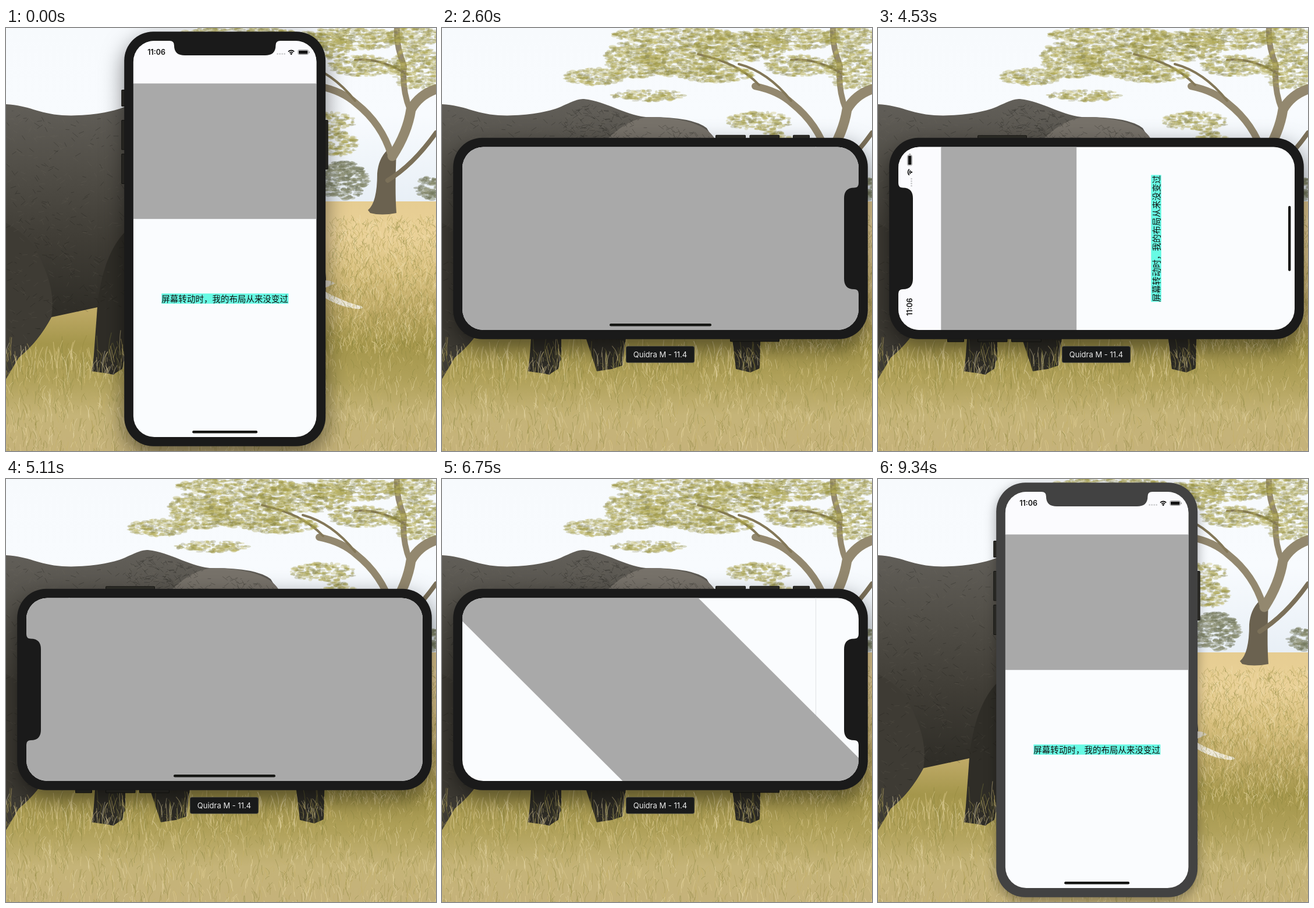
Animation of 739 by 727 pixels, one loop 9440 ms. Source, as an HTML page with a canvas:

```html
<!DOCTYPE html>
<html lang="zh">
<head>
<meta charset="utf-8">
<style>
html, body { margin: 0; width: 100%; height: 100%; overflow: hidden; background: #f8fafd; }
canvas { display: block; }
</style>
</head>
<body>
<canvas id="stage" width="739" height="727"></canvas>
<script>
const W = 739, H = 727, LOOP = 9440, RAD = Math.PI / 180;
const ctx = document.getElementById('stage').getContext('2d');
const GRAY = '#a9a9a9', WHITE = '#fafcfe', INK = '#161714';

// device: device angle; from/to: content angle relative to the device;
// dur, first, steps: timing of the turn; x0: progress at its first step
const turns = [
  { at: 0,    device: 0,   from: 0,   to: 0 },
  { at: 1950, device: 90,  from: 0,   to: -90, dur: 650, first: 200, steps: 5, x0: 0 },
  { at: 3640, device: 0,   from: -90, to: 0,   dur: 600, first: 150, steps: 5, x0: .16 },
  { at: 4530, device: -90, from: 0,   to: 90,  dur: 580, first: 150, steps: 5, x0: 0 },
  { at: 6000, device: 180, from: 90,  to: 90 },
  { at: 6750, device: 90,  from: 90,  to: 270, dur: 580, first: 150, steps: 5, x0: .326 },
  { at: 7770, device: 0,   from: -90, to: 0,   dur: 750, first: 150, steps: 6, x0: 0 }
];

const clamp = v => Math.max(0, Math.min(1, v));
const mix = (a, b, k) => a + (b - a) * k;
const ease = x => x * x * (3 - 2 * x);
const sideways = turn => Math.abs(turn.device) === 90;

let seed = 7;
function rand(a, b) {
  seed = (seed * 16807) % 2147483647;
  return mix(a, b, seed / 2147483647);
}

function gradient(c, y0, y1, colors) {
  const g = c.createLinearGradient(0, y0, 0, y1);
  colors.forEach((col, i) => g.addColorStop(i / (colors.length - 1), col));
  return g;
}

function shape(c, d, fill) {
  c.fillStyle = fill;
  c.fill(new Path2D(d));
}

function line(c, d, color, width) {
  c.strokeStyle = color;
  c.lineWidth = width;
  c.stroke(new Path2D(d));
}

function box(c, x, y, w, h, r, fill) {
  c.beginPath();
  c.roundRect(x, y, w, h, r);
  c.fillStyle = fill;
  c.fill();
}

function oval(c, x, y, rx, ry, fill) {
  c.beginPath();
  c.ellipse(x, y, rx, ry, 0, 0, 7);
  c.fillStyle = fill;
  c.fill();
}

function leaves(c, x, y, rx, ry, colors) {
  for (let i = 0; i < rx * ry / 4; i++) {
    const a = rand(0, 6.28), r = Math.sqrt(rand(0, 1));
    oval(c, x + Math.cos(a) * r * rx, y + Math.sin(a) * r * ry,
      rand(2, 7), rand(1, 3), colors[i % colors.length]);
  }
}

function paintScene() {
  const canvas = document.createElement('canvas');
  canvas.width = W;
  canvas.height = H;
  const c = canvas.getContext('2d');
  c.lineCap = c.lineJoin = 'round';

  c.fillStyle = gradient(c, 0, 300, ['#f7fafd', '#f8fbfe', '#e8eff6']);
  c.fillRect(0, 0, W, 310);
  c.fillStyle = gradient(c, 298, H,
    ['#e6cd92', '#ead198', '#d8c07f', '#bfaa67', '#a4964b', '#b0a15a', '#c5b478', '#c5b27a']);
  c.fillRect(0, 298, W, H);

  // distant bushes
  const dull = ['#7e826570', '#8f927270', '#6d715870'];
  leaves(c, 580, 262, 42, 33, dull);
  leaves(c, 728, 275, 22, 20, dull);

  // tree
  const bark = '#6b6250', limb = '#93886f';
  shape(c, 'M622 313Q638 300 638 250Q640 225 655 210L671 212Q668 280 671 318Q645 323 626 318Z', bark);
  line(c, 'M662 218Q646 165 602 130Q578 108 538 100', limb, 12);
  line(c, 'M664 220Q690 180 696 140Q710 115 739 105', limb, 17);
  line(c, 'M656 262Q700 235 739 180', '#7b7059', 8);
  line(c, 'M694 140Q680 105 684 65Q670 30 672 0', limb, 10);
  line(c, 'M545 98Q510 60 440 45M600 125Q560 75 510 62M690 80Q640 50 600 55', '#837758', 4);
  const olive = ['#8f8a3c48', '#b4aa5058', '#a39b4550', '#c9c07458', '#77743840'];
  [[262, 84, 50, 15], [335, 53, 55, 33], [400, 12, 105, 15], [415, 55, 75, 30],
   [470, 78, 65, 15], [515, 32, 80, 26], [595, 18, 85, 20], [612, 65, 55, 18],
   [705, 68, 42, 38], [700, 15, 45, 18], [355, 116, 62, 10], [545, 160, 55, 16],
   [570, 198, 32, 22]
  ].forEach(b => leaves(c, ...b, olive));

  // elephant
  const hide = gradient(c, 125, 600, ['#625f59', '#514e47', '#403d36', '#302e28', '#2d2b25']);
  shape(c, 'M0 131C40 133 55 147 97 150C135 152 180 146 205 135C225 126 232 122 244 122' +
    'C285 127 310 148 350 153Q430 152 455 172L475 205L540 330L550 430L546 585L530 592' +
    'L505 586L496 510L320 500L310 580L292 586L266 590L248 535L205 530L201 585L185 595' +
    'L147 590Q157 540 157 480L78 497Q55 540 22 566L0 603Z', hide);
  shape(c, 'M286 189Q325 151 365 153Q448 157 468 189Z', '#77726a');
  shape(c, 'M205 350Q166 390 157 480L149 588L185 596L205 570Z', '#2f2d27');
  shape(c, 'M0 335Q48 360 65 410Q85 455 78 497Q55 540 22 566L0 603Z', '#3e3b34');
  c.save();
  c.clip(new Path2D('M0 140L90 156L205 150L244 128L350 160L460 182V200L205 210V480L78 495L0 590Z'));
  for (let i = 0; i < 1100; i++) {
    const x = rand(0, 460), y = rand(132, x > 204 ? 200 : 580);
    line(c, `M${x} ${y}l${rand(3, 9)} ${rand(-7, 8)}`, i % 2 ? '#18171348' : '#817c7028', 1);
  }
  c.restore();
  shape(c, 'M545 434Q558 433 566 439L547 447Z', '#ddd7c8');
  shape(c, 'M545 451Q580 471 611 478Q617 482 605 483Q574 480 545 462Z', '#eee9db');

  // grass, from far to near
  const straw = ['#e8d59a78', '#81803a68', '#c6b26680', '#f3e5bc70', '#94883e68'];
  for (let i = 0; i < 4200; i++) {
    const y = mix(330, 745, i / 4200), x = rand(y < 560 ? 555 : 0, W), h = rand(5, 25) * y / H;
    line(c, `M${x} ${y}q${rand(-3, 3)} ${-h / 2} ${rand(-7, 7)} ${-h}`, straw[i % 5], 1);
  }
  for (let i = 0; i < 260; i++) {
    const x = rand(0, 560), y = rand(560, 612), h = rand(15, 45);
    line(c, `M${x} ${y}q${rand(-4, 4)} ${-h / 2} ${rand(-9, 9)} ${-h}`, straw[i % 5], 1.2);
  }
  return canvas;
}

const scene = paintScene();

function indicator(angle, alpha) {
  if (alpha <= 0) return;
  const upright = angle === 0, w = upright ? 112 : 175, y = upright ? 329.5 : 146.2;
  ctx.save();
  ctx.rotate(angle * RAD);
  ctx.globalAlpha = alpha;
  box(ctx, -w / 2, y, w, 4.4, 2.2, INK);
  ctx.restore();
}

function statusBar(alpha) {
  if (alpha <= 0) return;
  ctx.save();
  ctx.globalAlpha = alpha;
  ctx.fillStyle = '#111';
  ctx.textAlign = 'left';
  ctx.font = '600 12.5px Inter, "Open Sans", sans-serif';
  ctx.fillText('11:06', -133, -320.5);
  for (let i = 0; i < 4; i++) oval(ctx, 90.5 + i * 4, -318, 1.3, 1.3, '#c4c5c7');
  ctx.strokeStyle = '#111';
  ctx.lineWidth = 1.8;
  for (const r of [3.9, 7]) {
    ctx.beginPath();
    ctx.arc(114, -317, r, -Math.PI * .76, -Math.PI * .24);
    ctx.stroke();
  }
  oval(ctx, 114, -318, 1.5, 1.5, '#111');
  ctx.beginPath();
  ctx.roundRect(125.5, -325, 18, 8, 2.3);
  ctx.lineWidth = .8;
  ctx.strokeStyle = '#888';
  ctx.stroke();
  box(ctx, 126.8, -323.8, 15.4, 5.7, 1, '#111');
  box(ctx, 144.4, -322.3, 1.3, 3, .6, '#888');
  ctx.restore();
}

function note(y) {
  ctx.fillStyle = '#67fae4';
  ctx.fillRect(-108.8, y - 8.7, 218, 17.5);
  ctx.fillStyle = '#111';
  ctx.font = '14.53px "Noto Sans CJK SC", "Noto Sans CJK", sans-serif';
  ctx.textAlign = 'center';
  ctx.textBaseline = 'middle';
  ctx.fillText('屏幕转动时，我的布局从来没变过', 0, y + .5);
}

function screen(turn, x) {
  const { from, to } = turn, p = ease(x);
  const wide = mix(from ? 1 : 0, to ? 1 : 0, p);
  const viaPortrait = !from || !to;

  ctx.save();
  ctx.beginPath();
  ctx.roundRect(-157.3, -340.5, 314.6, 681, 36);
  ctx.clip();
  ctx.fillStyle = WHITE;
  ctx.fillRect(-160, -345, 320, 690);
  ctx.fillStyle = '#dfe1e3';
  ctx.fillRect(-160, -267.5, 320, 1);

  ctx.save();
  ctx.rotate(mix(from, to, p) * RAD);
  const w = mix(315, 682, wide), q = (1 - wide) ** 1.5;
  const top = mix(-157.3, -267, q), bottom = mix(157.3, -34.3, q);
  const shift = viaPortrait ? 18 * Math.sin(Math.PI * Math.sqrt(1 - wide)) : 0;
  ctx.fillStyle = GRAY;
  ctx.fillRect(shift - w / 2, top, w, bottom - top);
  if (viaPortrait) note(mix(102.5, 286, wide));
  ctx.restore();

  if (viaPortrait) {
    ctx.globalAlpha = to ? 1 - x : 1;
    ctx.fillStyle = 'rgba(251,252,254,.76)';
    ctx.fillRect(-160, -345, 320, 78);
    ctx.fillStyle = 'rgba(0,0,0,.1)';
    ctx.fillRect(-160, -267.5, 320, 1);
    ctx.globalAlpha = 1;
  }
  ctx.textBaseline = 'middle';
  if (!from) statusBar(to ? 1 - 3 * x : 1);
  else if (!to) statusBar(4 * x - 3);
  if (from === to) indicator(to, 1);
  else {
    indicator(from, 1 - 3.7 * x);
    indicator(to, 4 * x - 3);
  }
  ctx.restore();
}

function phone(turn, x, active) {
  const bezel = active ? '#1a1a1a' : '#424242';
  ctx.save();
  if (sideways(turn)) ctx.translate(375.5, 361.8);
  else ctx.translate(376.2, 362.5);
  ctx.rotate(turn.device * RAD);
  for (const [bx, y, h] of [[-178, -256.5, 29], [-178, -204.5, 51.5], [-178, -146.5, 52], [171, -204.5, 85]]) {
    box(ctx, bx, y, 6.5, h, 1.5, '#181815');
    box(ctx, bx + 1, y + 1, 4.5, h - 2, 1, '#302f2a');
  }
  ctx.save();
  ctx.shadowColor = active ? 'rgba(0,0,0,.5)' : 'rgba(0,0,0,.35)';
  ctx.shadowBlur = active ? 38 : 20;
  ctx.shadowOffsetY = active ? 14 : 6;
  box(ctx, -173, -356.3, 346, 712.6, 50, bezel);
  ctx.restore();
  screen(turn, x);
  shape(ctx, 'M-95-342V-340.5Q-87.3-340.5-87.3-333C-87.3-320-80-315.5-69-315.5H69' +
    'C80-315.5 87.3-320 87.3-333Q87.3-340.5 95-340.5V-342Z', bezel);
  ctx.restore();
}

function caption() {
  box(ctx, 316, 546.5, 118, 29, 3.5, '#55554b');
  box(ctx, 316.7, 547.2, 116.6, 27.6, 3, '#191a1a');
  ctx.fillStyle = '#ececec';
  ctx.font = '13px Inter, "Open Sans", sans-serif';
  ctx.textAlign = 'center';
  ctx.textBaseline = 'middle';
  ctx.fillText('Quidra M - 11.4', 375, 562);
}

// the turn advances in held steps
function progress(turn, since) {
  if (!turn.dur) return 1;
  const { dur, first, steps, x0 } = turn;
  const k = since < first ? 0 : 1 + Math.floor((since - first) / ((dur - first) / (steps - 2)) + 1e-6);
  return clamp(mix(x0, 1, Math.min(k / (steps - 1), 1)));
}

function draw() {
  const t = performance.now() % LOOP;
  const turn = turns.findLast(s => s.at <= t);
  ctx.drawImage(scene, 0, 0);
  phone(turn, progress(turn, t - turn.at), t < 9340);
  if (sideways(turn)) caption();
  requestAnimationFrame(draw);
}
draw();
</script>
</body>
</html>
```
